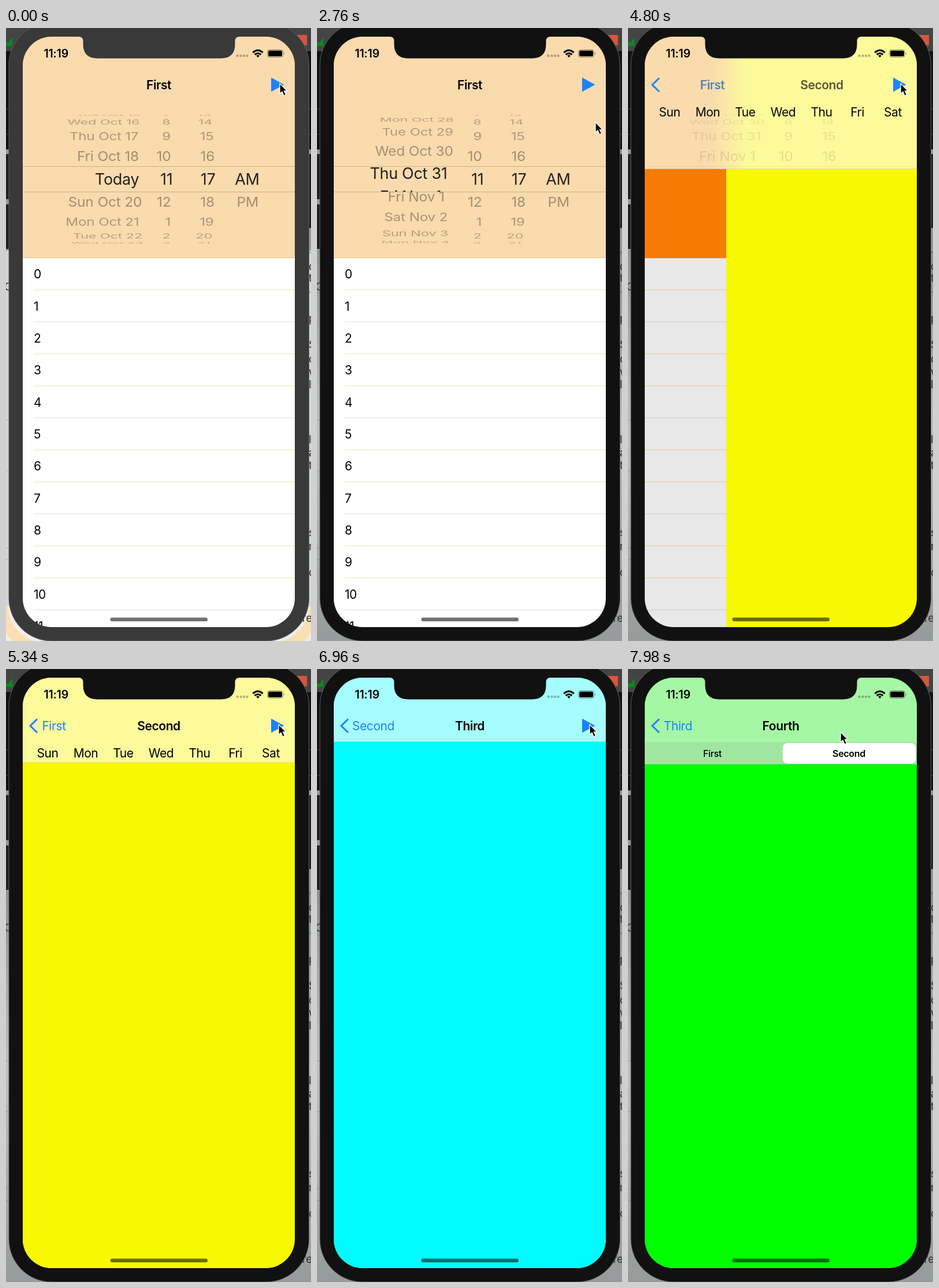
An HTML page for the animation above (8 s loop, 528 by 1060 pixels).

```html
<!DOCTYPE html>
<html lang="en">
<head>
<meta charset="utf-8">
<title>Navigation demo</title>
<style>
  html, body { margin: 0; width: 100%; height: 100%; overflow: hidden; background: #ccd2d2; }
  svg { display: block; width: 100vw; height: 100vh; font-family: Inter, Roboto, sans-serif; --bezel: #393939; }
  svg.active { --bezel: #111; }
  .bezel { fill: var(--bezel); }
  .shade, .active .glow { opacity: 0; }
  .active .shade { opacity: 1; }
  text { white-space: pre; }
  .body, .title, .label { font-size: 21px; letter-spacing: -.02em; }
  .title, .semi { font-weight: 600; }
  .title, .label, .mid { text-anchor: middle; }
  .label { fill: #1c82fb; }
  .wheel { font-size: 24.7px; letter-spacing: -.01em; }
  .lens { font-size: 27px; letter-spacing: -.01em; fill: #25211b; }
  .end { text-anchor: end; }
  .page { font-size: 19px; fill: #333; }
</style>
</head>
<body>
<svg id="stage" viewBox="0 0 528 1060" preserveAspectRatio="none">
  <defs>
    <clipPath id="screen"><rect x="29" y="15" width="471" height="1021" rx="50"/></clipPath>
    <clipPath id="barClip"><rect id="barCut" x="29" y="15" width="471" height="383"/></clipPath>
    <clipPath id="outside"><path d="M29 150H500V239.5H29ZM29 283.5H500V373H29Z"/></clipPath>
    <clipPath id="band"><rect x="29" y="240" width="471" height="43"/></clipPath>
    <linearGradient id="tint" gradientUnits="userSpaceOnUse"><stop/><stop offset="1"/></linearGradient>
    <linearGradient id="fall" x2="0" y2="1">
      <stop stop-color="#000" stop-opacity=".32"/><stop offset=".45" stop-color="#000" stop-opacity=".1"/>
      <stop offset="1" stop-color="#000" stop-opacity=".28"/>
    </linearGradient>
  </defs>
  <g id="desk">
    <rect width="528" height="1060" fill="#d0d6d6"/>
    <rect width="528" height="40" fill="#444"/>
    <path d="M0 31V24L4 26L11 16V31Z" fill="#0b8a20"/>
    <rect x="503" y="12" width="18" height="18" fill="#d8553c"/>
    <rect y="40" width="528" height="170" fill="#111"/>
    <path d="M0 140H528M0 184H528" stroke="#444"/>
    <rect y="210" width="528" height="175" fill="#999"/>
    <path d="M0 218H8V296H0ZM0 305H8V382H0ZM520 218H528V346H520Z" fill="#202020"/>
    <path d="M0 677.5H8M0 765.5H8M0 898.5H8M0 919.5H8" stroke="#a9afaf"/>
    <path d="M520 388H528M520 457H528" stroke="#268a86"/>
    <rect class="shade" y="385" width="528" height="675" fill="url(#fall)"/>
    <g class="glow">
      <path d="M0 1000H528V1060H0Z" fill="#eee"/>
      <path d="M-6 1000Q0 1062 62 1072M534 1000Q528 1062 466 1072" fill="none" stroke="#fbdfb2" stroke-width="18"/>
    </g>
  </g>
  <rect class="bezel" x="5" y="-10" width="519.5" height="1070" rx="74" stroke="#606060"/>
  <g clip-path="url(#screen)">
    <g id="home">
      <rect x="29" y="15" width="471" height="383" fill="#f57c00"/>
      <rect x="29" y="398" width="471" height="640" fill="#fff"/>
      <g id="list"></g>
    </g>
    <rect id="back" x="29" y="15" width="471" height="1021"/>
    <rect id="dim" x="29" width="471" height="1021"/>
    <rect id="front" y="15" width="471" height="1021"/>
    <rect id="bar" x="29" y="15" width="471" height="383" fill="url(#tint)"/>
    <rect id="edge" x="29" width="471" height="1" fill="#000" opacity=".1"/>
    <g clip-path="url(#barClip)">
      <g id="picker">
        <path d="M29 239.5H500M29 283.5H500" stroke="#000" stroke-opacity=".2"/>
        <g id="wheels" clip-path="url(#outside)"></g>
        <g id="lenses" clip-path="url(#band)"></g>
      </g>
      <g id="week"></g>
      <g id="segments">
        <rect x="29" y="126" width="471" height="39" rx="7" fill="#767680" opacity=".12"/>
        <rect x="268" y="128" width="230" height="35.5" rx="8" fill="#fff"/>
        <text class="mid" x="146" y="152" font-size="16" font-weight="500" letter-spacing="-.3">First</text>
        <text class="mid semi" x="382.5" y="152" font-size="16" letter-spacing="-.3">Second</text>
      </g>
    </g>
    <path id="chevron" d="M54 86.5L42 98.3L54 110" fill="none" stroke="#1c82fb" stroke-width="3"/>
    <text id="oldLabel" class="label" y="105.5"></text>
    <text id="oldTitle" class="title" y="105.5"></text>
    <text id="newLabel" class="label" y="105.5"></text>
    <text id="newTitle" class="title" y="105.5"></text>
    <path id="playOff" d="M459.5 86.5L480.5 98L459.5 109.5Z" fill="#bfc1c4"/>
    <path id="play" d="M459.5 86.5L480.5 98L459.5 109.5Z" fill="#1c82fb" stroke="#1c82fb" stroke-linejoin="round"/>
    <text class="semi" x="65.500" y="51" font-size="19.5" letter-spacing="-.2">11:19</text>
    <g opacity=".28"><circle cx="400.500" cy="48" r="2.200"/><circle cx="406.500" cy="48" r="2.200"/><circle cx="412" cy="48" r="2.200"/><circle cx="417.500" cy="48" r="2.200"/></g>
    <g fill="none" stroke="#000" stroke-width="3">
      <path d="M427.300 42.500Q436 34.500 444.700 42.500M430.600 46Q436 41.500 441.400 46"/>
      <path d="M433.200 47.800Q436 45.700 438.800 47.800L436 51Z" fill="#000" stroke="none"/>
    </g>
    <rect x="452.500" y="37.500" width="27" height="13" rx="4" fill="none" stroke="#000" stroke-opacity=".45"/>
    <rect x="454" y="39" width="24" height="10" rx="2.500"/>
    <path d="M481 42Q483 44 481 46Z" opacity=".5"/>
    <rect x="180.500" y="1019.500" width="168.500" height="6.500" rx="3.250" opacity=".56"/>
  </g>
  <path class="bezel" d="M126 14V15Q133.500 15 133.500 23V28Q133.500 52.500 158 52.500H372Q396.500 52.500 396.500 28V23Q396.500 15 404 15V14Z"/>
  <circle id="touch" r="27.500" fill="#fff" fill-opacity=".1" stroke="#000" stroke-width="2"/>
  <path id="cursor" d="M0 0V17.500L4 14L7 21L10.500 19.500L7.500 12.800H12.500Z" stroke="#fff" stroke-width="1.300"/>
</svg>
<script>
const LOOP = 8000, STEP = 60;
const LEFT = 29, WIDTH = 471, CENTRE = 264.5;
const PICK_Y = 261.3, RADIUS = 111.5, TURN = 20.7 * Math.PI / 180;
const MONTH_X = -106.5, GAP = 7;
const DAYS = ['Sun', 'Mon', 'Tue', 'Wed', 'Thu', 'Fri', 'Sat'];

const SCREENS = [
  { name: 'First', bar: '#fadbae', fill: '#f57c00', bottom: 398, labelX: 83 },
  { name: 'Second', bar: '#fdfa9b', fill: '#f8f800', bottom: 162, labelX: 97.5 },
  { name: 'Third', bar: '#a5fdff', fill: '#00fbfe', bottom: 126, labelX: 86.5 },
  { name: 'Fourth', bar: '#a5f7a5', fill: '#00ff00', bottom: 165, labelX: 90 }
];
const PUSHES = [4615, 6456, 7400];
const PRESSES = [[1620, 2160], [4260, 4560], [6300, 6440], [7320, 7400]];
const PATH = [
  [0, 474, 96], [720, 474, 96], [1500, 205, 292], [1860, 205, 292],
  [2160, 222, 120], [2760, 482, 163], [3240, 472, 96], [7600, 472, 96], [7980, 368, 109]
];

const $ = id => document.getElementById(id);
const clamp = v => Math.max(0, Math.min(1, v));
const mix = (a, b, u) => a + (b - a) * u;
const set = (node, attrs) => { for (const k in attrs) node.setAttribute(k, attrs[k]); };

function add(parent, tag, attrs, text) {
  const node = document.createElementNS('http://www.w3.org/2000/svg', tag);
  set(node, attrs);
  if (text !== undefined) node.textContent = text;
  parent.appendChild(node);
  return node;
}

// Cylinder projection for a row k places from the middle.
function turn(node, k) {
  const a = k * TURN, flat = Math.cos(a), s = 1 - .005 * k * k;
  set(node, {
    transform: `translate(${CENTRE} ${PICK_Y + RADIUS * Math.sin(a)}) scale(${s} ${Math.max(flat, .01)})`,
    opacity: Math.abs(a) < Math.PI / 2 ? .39 - .04 * Math.abs(k) : 0
  });
}

function buildList() {
  for (let i = 0; i < 12; i++) {
    const y = 398 + i * 55.35;
    add($('list'), 'text', { class: 'body', x: 48, y: y + 35.3 }, i);
    add($('list'), 'rect', { x: 48, y: y + 54, width: 452, height: 1.2, fill: i % 3 === 1 ? '#e3e3e5' : '#f9e2bd' });
  }
}

function buildColumn(first, x, lensX) {
  for (let k = -4; k <= 4; k++) {
    const value = first === 11 ? (first + k - 1) % 12 + 1 : first + k;
    const row = add($('wheels'), 'text', { class: 'wheel end', x, y: 9 }, value);
    turn(row, k);
    if (!k) add($('lenses'), 'text', { class: 'lens end', x: lensX, y: PICK_Y + 9.8 }, value);
  }
}

function buildDates(parent, cls, count, dy, x) {
  return Array.from({ length: count }, () => {
    const g = add(parent, 'g', { class: cls });
    return { g, day: add(g, 'text', { class: 'end', x: x - GAP, y: dy }), date: add(g, 'text', { y: dy }), x };
  });
}

function fillDate(row, n) {
  const d = 19 + n;
  row.day.textContent = n ? DAYS[(n + 706) % 7] : '';
  row.date.textContent = n ? (d > 31 ? 'Nov ' + (d - 31) : 'Oct ' + d) : 'Today';
  set(row.date, { x: n ? row.x : -34, 'text-anchor': n ? 'start' : 'end' });
}

function buildDesk() {
  const marks = [[413, 'd'], [433, 't'], [503, 'p'], [548, 'S'], [573, 'c'], [595, 'w'], [617, 'l'],
    [712, 'l'], [735, 'a'], [757, 't'], [873, 's'], [897, 'n'], [942, 'o']];
  for (const [y, s] of marks) add($('desk'), 'text', { class: 'page', x: 524, y: y + 6 }, s);
  add($('desk'), 'text', { class: 'page', x: 501, y: 1027 }, 'ore');
  add($('desk'), 'text', { class: 'page', x: -3, y: 454 }, 'C');
}

buildDesk();
buildList();
buildColumn(11, 21, 288.5);
buildColumn(17, 97, 362.5);
const wheel = buildDates($('wheels'), 'wheel', 9, 9, MONTH_X);
const lens = buildDates($('lenses'), 'lens', 3, 9.8, -117.5);
turn(add($('wheels'), 'text', { class: 'wheel mid', x: 154.5, y: 9 }, 'PM'), 1);
add($('lenses'), 'text', { class: 'lens mid', x: 417.5, y: PICK_Y + 9.8 }, 'AM');
[72, 138, 203, 268.5, 335, 397, 458.5].forEach((x, i) =>
  add($('week'), 'text', { class: 'body mid', x, y: 152.5 }, DAYS[i]));

const spring = ms => 1 - (1 + ms * .013) * Math.exp(-ms * .013);
const ease = ms => ms <= 0 ? 0 : ms >= 500 ? 1 : spring(ms) / spring(500);

function pointer(t) {
  let i = PATH.length - 2;
  while (i && t < PATH[i][0]) i--;
  const [t0, x0, y0] = PATH[i], [t1, x1, y1] = PATH[i + 1];
  const u = clamp((t - t0) / (t1 - t0));
  const e = t0 === 1860 ? u * u : u * u * (3 - 2 * u);
  return [mix(x0, x1, e), mix(y0, y1, e)];
}

// Follows the drag, then glides to rest on the fourteenth row.
function rowsScrolled(t, y) {
  if (t < 1860) return 0;
  if (t < 2160) return (292 - y) / 39.5;
  return 14 - 9.65 * Math.pow(1 - clamp((t - 2160) / 1560), 3.52);
}

function drawPicker(off) {
  const mid = Math.round(off);
  wheel.forEach((row, i) => {
    const n = mid + i - 4;
    fillDate(row, n);
    turn(row.g, n - off);
  });
  lens.forEach((row, i) => {
    const n = mid + i - 1;
    fillDate(row, n);
    set(row.g, { transform: `translate(${CENTRE} ${PICK_Y + (n - off) * 40.5})` });
  });
}

function drawScreens(i, p) {
  const from = SCREENS[i], to = SCREENS[i + 1];
  const q = Math.pow(p, 1.2);
  const x = LEFT + WIDTH * (1 - p);
  const bottom = mix(from.bottom, to.bottom, q);
  const first = i === 0;

  set($('home'), { transform: `translate(${-.3 * WIDTH * p})`, opacity: first ? 1 : 0 });
  set($('back'), { fill: from.fill, opacity: first ? 0 : 1 });
  set($('dim'), { y: first ? 398 : 15, opacity: .13 * p });
  set($('front'), { x, fill: to.fill });

  set($('tint'), { x1: x - 25, x2: x + 35 });
  const [a, b] = $('tint').children;
  set(a, { 'stop-color': p === 1 ? to.bar : from.bar });
  set(b, { 'stop-color': p === 0 ? from.bar : to.bar });
  set($('bar'), { height: bottom - 15 });
  set($('barCut'), { height: bottom - 15 });
  set($('edge'), { y: bottom - 1 });

  set($('picker'), { opacity: first ? 1 - p : 0 });
  set($('week'), { opacity: first ? clamp(p * 1.4) : i === 1 ? 1 - p : 0 });
  set($('segments'), { opacity: i === 2 ? p : 0 });

  const prev = SCREENS[i - 1];
  const moving = mix(CENTRE, from.labelX, q);
  $('oldLabel').textContent = prev ? prev.name : '';
  $('oldTitle').textContent = $('newLabel').textContent = from.name;
  $('newTitle').textContent = to.name;
  set($('oldLabel'), { x: prev ? prev.labelX - 120 * q : 0, opacity: 1 - q });
  set($('oldTitle'), { x: moving, opacity: 1 - q });
  set($('newLabel'), { x: moving, opacity: q });
  set($('newTitle'), { x: CENTRE + 204 * (1 - q), opacity: q });
  set($('chevron'), { opacity: first ? clamp(q * 1.8) : 1 });

  const last = i === 2;
  set($('play'), { opacity: p === 0 ? 1 : last ? 0 : clamp(p * 1.4) });
  set($('playOff'), { opacity: 1 - p });
}

function draw(now) {
  const t = Math.floor(now % LOOP / STEP) * STEP;
  const [x, y] = pointer(t);
  const i = Math.max(0, PUSHES.filter(s => s <= t).length - 1);
  $('stage').classList.toggle('active', t >= 1560);
  drawPicker(rowsScrolled(t, y));
  drawScreens(i, ease(t - PUSHES[i]));
  set($('cursor'), { transform: `translate(${x} ${y})` });
  set($('touch'), { cx: x - 1, cy: y + 2, opacity: PRESSES.some(([s, e]) => t >= s && t < e) ? 1 : 0 });
}

const start = performance.now();
function tick() {
  draw(performance.now() - start);
  requestAnimationFrame(tick);
}
tick();
</script>
</body>
</html>
```
